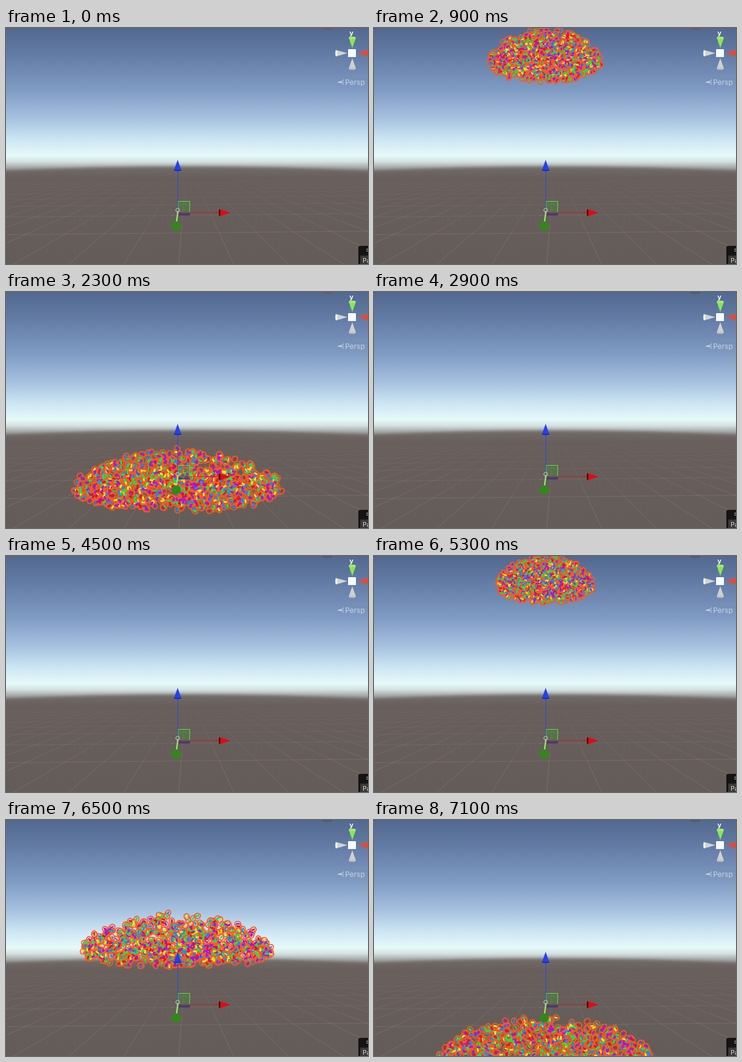
Write an HTML page with a canvas that moves like this. It is 600 px wide and 390 px high and loops after 7200 ms.

```html
<!DOCTYPE html>
<html lang="en">
<head>
<meta charset="utf-8">
<title>Confetti burst</title>
<style>
html, body { margin: 0; width: 100%; height: 100%; overflow: hidden; }
canvas { display: block; width: 600px; height: 390px; }
</style>
</head>
<body>
<canvas id="stage" width="600" height="390"></canvas>
<script>
const W = 600, H = 390, LOOP = 7200;
const ctx = document.getElementById('stage').getContext('2d');
const COLORS = ['#d81432', '#22e04a', '#22e04a', '#128ff0', '#f2e322', '#a414e4', '#a414e4'];
const BURSTS = [50, 4600];
const HORIZON = 225;

// Height of the cloud centre: seconds after the burst, then y
const PATH = [[0, 303], [.1, 205], [.2, 138], [.4, 68], [.65, 43], [.85, 49],
  [1.3, 75], [1.65, 137], [2.5, 392], [2.85, 482], [3.3, 620]];

function randomizer(seed) {
  return () => {
    seed = (seed + 0x6D2B79F5) | 0;
    let n = Math.imul(seed ^ seed >>> 15, 1 | seed);
    n = n + Math.imul(n ^ n >>> 7, 61 | n) ^ n;
    return ((n ^ n >>> 14) >>> 0) / 4294967296;
  };
}

// Each piece sits inside a ball whose middle bulges upwards
function makePieces(seed) {
  const rnd = randomizer(seed);
  return Array.from({ length: 820 }, () => {
    const rho = Math.sqrt(rnd()), a = rnd() * Math.PI * 2;
    return {
      x: rho * Math.cos(a),
      z: rho * Math.sin(a),
      lift: (rnd() * 2 - 1) * Math.sqrt(1 - rho * rho) + .4 * (rho * rho - .6),
      angle: rnd() * Math.PI * 2,
      spin: (rnd() - .5) * 8,
      tilt: rnd() * 6,
      color: COLORS[Math.floor(rnd() * COLORS.length)]
    };
  });
}

const clouds = BURSTS.map((start, i) => ({ start, pieces: makePieces(17 + i * 40) }));

function pathY(s) {
  let i = 0;
  while (i < PATH.length - 2 && s > PATH[i + 1][0]) i++;
  const slope = j => {
    const a = PATH[Math.max(j - 1, 0)], b = PATH[Math.min(j + 1, PATH.length - 1)];
    return (b[1] - a[1]) / (b[0] - a[0]);
  };
  const [t0, y0] = PATH[i], [t1, y1] = PATH[i + 1];
  const d = t1 - t0, u = (s - t0) / d, v = 1 - u;
  return v * v * (1 + 2 * u) * y0 + u * u * (3 - 2 * u) * y1
    + d * u * v * (v * slope(i) - u * slope(i + 1));
}

function polygon(g, points, fill) {
  g.beginPath();
  points.forEach(([x, y]) => g.lineTo(x, y));
  g.closePath();
  g.fillStyle = fill;
  g.fill();
}

function line(g, x0, y0, x1, y1, color, width) {
  g.beginPath();
  g.moveTo(x0, y0);
  g.lineTo(x1, y1);
  g.strokeStyle = color;
  g.lineWidth = width;
  g.stroke();
}

function ellipse(g, x, y, rx, ry, fill) {
  g.beginPath();
  g.ellipse(x, y, rx, ry, 0, 0, Math.PI * 2);
  g.fillStyle = fill;
  g.fill();
}

function gradient(g, y0, y1, stops) {
  const fill = g.createLinearGradient(0, y0, 0, y1);
  stops.forEach(([p, c]) => fill.addColorStop(p, c));
  return fill;
}

function drawScene(g) {
  g.fillStyle = gradient(g, 0, 240, [[0, '#52688f'], [.25, '#6a84ae'], [.42, '#7f9ac2'],
    [.62, '#a6c1e0'], [.78, '#d0e8f5'], [.88, '#e6fafa'], [.92, '#d3e1e0'], [.97, '#9a9d9c'], [1, '#7a7573']]);
  g.fillRect(0, 0, W, H);

  g.save();
  g.filter = 'blur(2.5px)';
  g.beginPath();
  g.moveTo(-20, 237);
  g.quadraticCurveTo(300, 221, 620, 237);
  g.lineTo(620, 410);
  g.lineTo(-20, 410);
  g.fillStyle = gradient(g, 228, 390, [[0, '#736c69'], [.12, '#685f5c'], [1, '#645c59']]);
  g.fill();
  g.restore();

  const fade = gradient(g, 242, 350, [[0, 'rgba(190,184,180,0)'], [1, 'rgba(190,184,180,.19)']]);
  for (let k = 2; k < 12; k++) {
    const y = 222 + 350 / k;
    line(g, 0, y + 3, W, y - 3, fade, 1);
  }
  for (let n = -22; n <= 22; n++) line(g, 300, 222, 286 + n * 92, 392, fade, 1);
}

function drawHandles(g) {
  g.fillStyle = 'rgba(62,150,55,.4)';
  g.fillRect(286, 286, 18, 18);
  g.strokeStyle = '#68d843';
  g.lineWidth = 1;
  g.strokeRect(285.5, 286.5, 19, 18);
  g.fillStyle = 'rgba(50,48,135,.7)';
  g.fillRect(286, 306, 19, 4);

  line(g, 284.7, 302, 284.7, 234, '#3348d6', 1.2);
  polygon(g, [[284.5, 218], [291, 236], [278, 236]], '#2340f0');
  ellipse(g, 284.5, 235.3, 6, 1, '#1c2f9c');

  line(g, 285, 304.5, 355, 305, '#cf1c26', 1.2);
  polygon(g, [[372, 305.3], [354, 311.5], [353, 299]], '#df0c17');
  ellipse(g, 354, 305.3, 1.2, 6, '#42080b');

  line(g, 285, 303, 282.5, 321, '#9bea65', 2.2);
  ellipse(g, 282, 327, 7.6, 7.6, '#2f8a1a');
  g.beginPath();
  g.arc(284.5, 301, 3, 0, Math.PI * 2);
  g.strokeStyle = '#c9d5c9';
  g.lineWidth = 1;
  g.stroke();
}

function drawOverlay(g) {
  polygon(g, [[568, 16], [580, 16], [574, 33]], '#8be655');
  ellipse(g, 574, 16, 6, 1.8, '#a5ee78');
  polygon(g, [[547, 36.5], [547, 47], [566, 41.5]], '#d2d3d2');
  ellipse(g, 547.5, 41.7, 1.8, 5.2, '#eeeeec');
  polygon(g, [[600, 36], [600, 47], [583, 41.5]], '#dd4d3d');
  polygon(g, [[574, 50], [580, 67], [568, 67]], '#cfd0cf');
  ellipse(g, 574, 67, 6, 2, '#c2c4c5');
  g.fillStyle = '#f8fbfc';
  g.fillRect(567, 35, 13, 13);

  g.textBaseline = 'alphabetic';
  g.textAlign = 'center';
  g.font = 'bold 11px Inter, sans-serif';
  g.fillText('y', 572.5, 11.5);
  g.textAlign = 'left';
  g.font = '12px Inter, sans-serif';
  g.fillStyle = '#c8d1db';
  g.fillText('Persp', 562, 94);
  g.beginPath();
  g.moveTo(560, 85.5);
  g.quadraticCurveTo(556, 89, 550, 89.5);
  g.quadraticCurveTo(556, 90, 560, 93.5);
  g.strokeStyle = '#c8d1db';
  g.lineWidth = 1;
  g.stroke();
  line(g, 550, 89.5, 560, 89.5, '#c8d1db', 1);

  g.fillStyle = '#151414';
  g.beginPath();
  g.roundRect(584, 360, 24, 40, 3);
  g.fill();
  g.fillStyle = '#3a3938';
  g.fillRect(587, 376, 13, 14);
  line(g, 597, 365.5, 600, 365.5, '#c8c8c8', 1);
  line(g, 597, 368.5, 600, 368.5, '#c8c8c8', 1);
  g.font = '10.5px Inter, sans-serif';
  g.fillStyle = '#dddddd';
  g.fillText('Pa', 591, 388);
}

function layer(draw) {
  const canvas = document.createElement('canvas');
  canvas.width = W;
  canvas.height = H;
  draw(canvas.getContext('2d'));
  return canvas;
}

function drawCloud({ start, pieces }, time) {
  const s = (time - start) / 1000;
  if (s < 0 || s > 3.3) return;
  const centerY = pathY(s);
  const radius = 236 * (1 - Math.exp(-.6 * s));
  const depth = radius * (HORIZON - centerY) * .0015;
  const thickness = 46 * (1 - Math.exp(-1.7 * s));
  const size = Math.min(.72 + .18 * s, 1.1);
  const spots = pieces.map(p => ({
    p,
    x: 284 + p.x * radius,
    y: centerY + p.z * depth + p.lift * thickness
  }));

  ctx.strokeStyle = '#fa5a20';
  ctx.lineWidth = 1.7;
  for (const { p, x, y } of spots) {
    ctx.beginPath();
    ctx.ellipse(x, y, 4.8 * size, 4 * size, p.angle + p.spin * s, 0, Math.PI * 2);
    ctx.stroke();
  }
  for (const { p, x, y } of spots) {
    const w = 5.4 * size, h = (1.6 + 1.4 * Math.abs(Math.sin(p.tilt + 3 * s))) * size;
    ctx.save();
    ctx.translate(x, y);
    ctx.rotate(p.angle + p.spin * s);
    ctx.fillStyle = p.color;
    ctx.fillRect(-w / 2, -h / 2, w, h);
    ctx.restore();
  }
}

const scene = layer(drawScene);
const front = layer(g => { drawHandles(g); drawOverlay(g); });

function render(time) {
  ctx.drawImage(scene, 0, 0);
  clouds.forEach(cloud => drawCloud(cloud, time));
  ctx.drawImage(front, 0, 0);
  ctx.fillStyle = time < 2500 ? '#75505f' : '#4b5362';
  ctx.fillRect(525, 1, 15, 1.5);
}

const origin = performance.now();
function tick() {
  const elapsed = (performance.now() - origin) % LOOP;
  render(Math.floor(elapsed / 100) * 100);
  requestAnimationFrame(tick);
}
tick();
</script>
</body>
</html>
```
